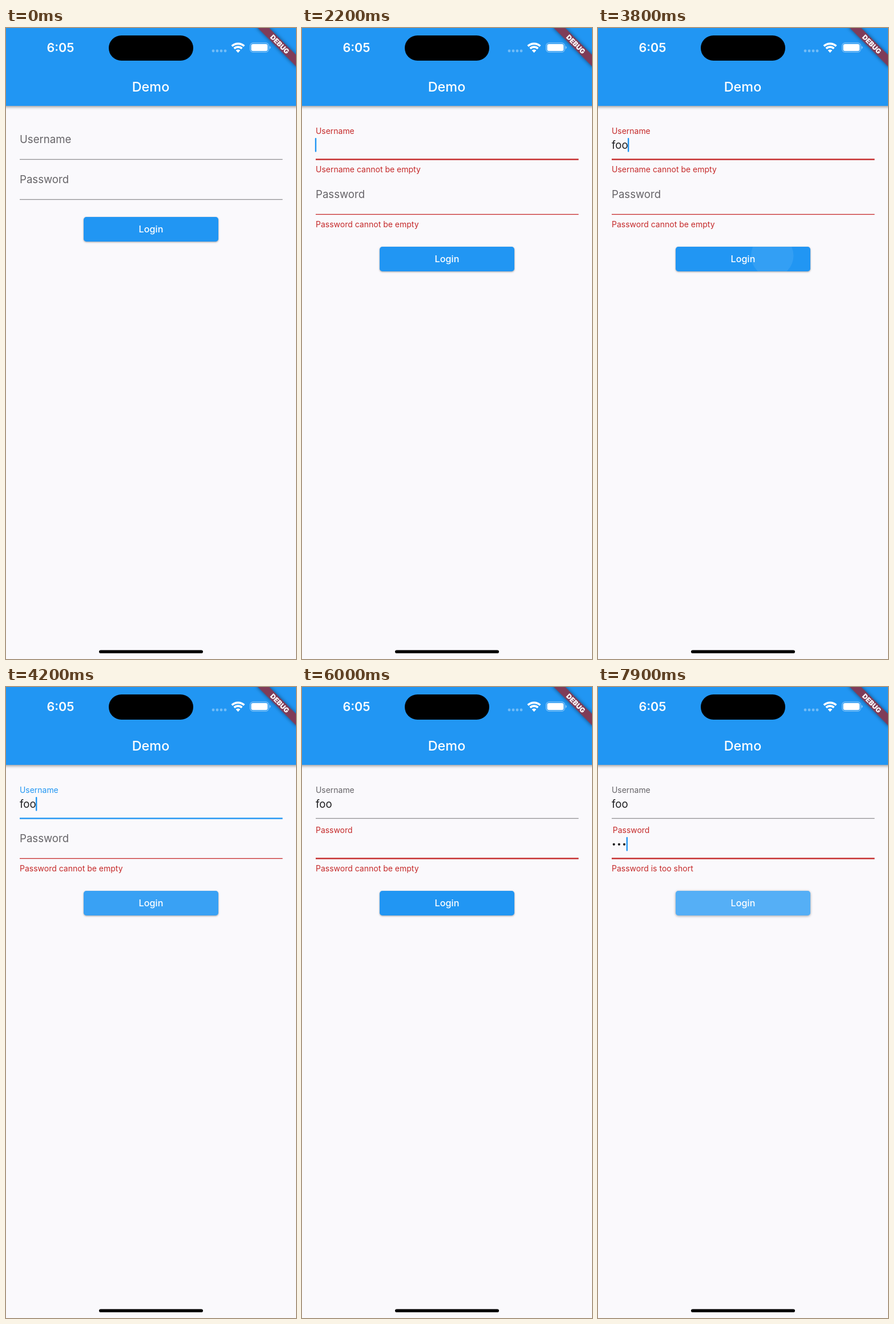
These frames come from a looping animation (508x1102 px, 8 s). An HTML page:

```html
<!DOCTYPE html>
<html lang="en">
<head>
<meta charset="utf-8">
<title>Login form demo</title>
<style>
html, body { margin: 0; width: 100%; height: 100%; overflow: hidden; background: #faf9fc; }
svg { display: block; width: 508px; height: 1102px; font-family: Inter, Roboto, sans-serif; }
text { white-space: pre; }
.mid { text-anchor: middle; fill: #fff; }
.bar { filter: drop-shadow(0 2px 2.5px rgba(0, 0, 0, .38)); }
</style>
</head>
<body>
<svg viewBox="0 0 508 1102">
  <defs>
    <clipPath id="clip"><rect x="-118" y="-21.5" width="236" height="43" rx="4.7"/></clipPath>
  </defs>
  <rect width="508" height="1102" fill="#faf9fc"/>
  <g id="fields"></g>

  <g id="button">
    <rect id="face" x="-118" y="-21.5" width="236" height="43" rx="4.7" fill="#2196f3"/>
    <g clip-path="url(#clip)"><circle id="ripple" fill="#fff"/></g>
    <text class="mid" y="5.5" font-size="16.2" font-weight="500">Login</text>
  </g>

  <rect class="bar" x="-10" y="-10" width="528" height="146" fill="#2196f3"/>
  <text class="mid" x="253.5" y="111" font-size="23.4" font-weight="500">Demo</text>
  <text class="mid" x="95.5" y="42.3" font-size="21.5" font-weight="600">6:05</text>
  <rect x="180" y="13" width="148" height="44" rx="22"/>
  <g id="signal" fill="#fff" opacity=".36"></g>
  <path id="wifi" fill="none" stroke="#fff" stroke-width="3.7"/>
  <path d="M406.5 43.2l-3.9-4.1a5.6 5.6 0 0 1 7.8 0z" fill="#fff"/>
  <rect x="427.6" y="26.1" width="32.6" height="16" rx="5" fill="none" stroke="#fff" stroke-opacity=".45" stroke-width="1.2"/>
  <rect x="429.5" y="28" width="28.8" height="12.2" rx="3.2" fill="#fff"/>
  <path d="M461.7 31.5q2 .7 2 2.6t-2 2.6z" fill="#fff" opacity=".5"/>

  <g transform="translate(508 0) rotate(45)">
    <rect x="-50" y="33.1" width="100" height="14.2" style="filter:drop-shadow(0 0 3.5px rgba(0,0,0,.5))" fill="#7f3c58"/>
    <text class="mid" y="44.5" font-size="11.9" font-weight="900">DEBUG</text>
  </g>
  <rect x="163" y="1086.5" width="182" height="5.6" rx="2.8"/>
</svg>
<script>
const LOOP = 8000, STEP = 167;
const GRAY = [102, 100, 104], LINE = [146, 145, 148], RED = [197, 42, 42], BLUE = [33, 150, 243];
const ERROR_ON = 1034, USER_FOCUS = 1990, USER_VALID = 3905, PASS_FOCUS = 5200, TOO_SHORT = 7750;
const USER_KEYS = [2400, 2560, 2720], PASS_KEYS = [6480, 6580, 6690];
// press time, release time, touch offset from the button's centre
const TAPS = [[980, 1022, 39, 14], [3775, 3894, 52, -6], [7660, 7715, 40, 4]];

const $ = id => document.getElementById(id);
const set = (id, attrs) => { for (const k in attrs) $(id).setAttribute(k, attrs[k]); };
const ramp = (t, start, length = STEP) => Math.min(1, Math.max(0, (t - start) / length));
const mix = (a, b, p) => a + (b - a) * p;
const rgb = c => `rgb(${c.map(Math.round)})`;

function bezier(x1, y1, x2, y2) {
  const at = (a, b, s) => 3 * a * s * (1 - s) ** 2 + 3 * b * s * s * (1 - s) + s ** 3;
  return x => {
    let lo = 0, hi = 1;
    for (let i = 0; i < 20; i++) {
      const s = (lo + hi) / 2;
      if (at(x1, x2, s) < x) lo = s; else hi = s;
    }
    return at(y1, y2, hi);
  };
}
const ease = bezier(.25, .1, .25, 1), fastOutSlowIn = bezier(.4, 0, .2, 1);

// Blends through [start, colour] changes
const colour = (t, first, changes) => rgb(changes.reduce(
  (c, [start, next]) => c.map((v, i) => mix(v, next[i], ramp(t, start))), first));

function shake(t, start) {
  const p = ramp(t, start);
  return 4.72 * (p <= .25 ? -p : p < .75 ? p - .5 : (1 - p) * 4);
}

function blink(ms) {
  const u = ms % 1000;
  return u < 850 ? 1 - ramp(u, 500, 150) : ramp(u, 850, 150);
}

const field = (id, label) => `<g id="${id}">
  <text id="${id}Label" font-size="18.6">${label}</text>
  <g id="${id}Value" fill="#1d1d1f"></g>
  <rect id="${id}Line" x="24" width="460.5"/>
  <rect id="${id}Caret" y="192" width="2.4" height="24.5" rx="1" fill="#2196f3"/>
  <text id="${id}Error" x="24" font-size="14" fill="${rgb(RED)}"></text></g>`;
$('fields').innerHTML = field('user', 'Username') + field('pass', 'Password');
$('userValue').innerHTML = '<text id="typed" x="24" y="210.5" font-size="18.6"></text>';
$('passValue').innerHTML = [0, 1, 2].map(i => `<circle id="dot${i}" cx="${27.8 + 9.1 * i}" cy="204.8" r="2.1"/>`).join('');
$('signal').innerHTML = [0, 1, 2, 3].map(i => `<circle cx="${363 + 7 * i}" cy="40" r="2.4"/>`).join('');
set('wifi', { d: [10, 15.8].map(r => {
  const dx = r * Math.sin(.75), y = 43.2 - r * Math.cos(.75);
  return `M${406.5 - dx} ${y}A${r} ${r} 0 0 1 ${406.5 + dx} ${y}`;
}).join('') });

function drawField(id, t, f) {
  const up = fastOutSlowIn(ramp(t, f.focus));
  const thick = mix(1.3, 2.4, ramp(t, f.focus) - ramp(t, f.blur));
  const count = f.keys.filter(k => t >= k).length;
  const active = t >= f.focus && t < f.blur;
  set(id, { transform: `translate(0 ${f.y})` });
  set(id + 'Label', {
    transform: `translate(${24 + f.shake} ${mix(200.7, 185.2, up)}) scale(${mix(1, .75, up)})`,
    fill: colour(t, GRAY, f.labelColours)
  });
  set(id + 'Line', { y: 229.5 - thick / 2, height: thick, fill: colour(t, LINE, f.lineColours) });
  set(id + 'Caret', {
    x: count ? f.caret(count) : 22.8,
    opacity: active ? blink(t - (count ? f.keys[count - 1] : f.focus)) : 0
  });
  set(id + 'Error', { y: 252 - 4.6 * (1 - f.error), opacity: f.error });
  $(id + 'Error').textContent = f.message;
  return count;
}

function draw(t) {
  const userShift = t >= ERROR_ON && t < USER_VALID + STEP ? 26 : 0;
  const passShift = t >= ERROR_ON ? 26 : 0;

  const letters = drawField('user', t, {
    y: 0, focus: USER_FOCUS, blur: PASS_FOCUS, keys: USER_KEYS,
    shake: shake(t, ERROR_ON), caret: n => 19 + 11 * n,
    labelColours: [[USER_FOCUS, RED], [USER_VALID, BLUE], [PASS_FOCUS, GRAY]],
    lineColours: [[ERROR_ON, RED], [USER_VALID, BLUE], [PASS_FOCUS, LINE]],
    error: ramp(t, ERROR_ON) - ramp(t, USER_VALID), message: 'Username cannot be empty'
  });
  $('typed').textContent = 'foo'.slice(0, letters);

  const dots = drawField('pass', t, {
    y: 70 + userShift, focus: PASS_FOCUS, blur: Infinity, keys: PASS_KEYS,
    shake: shake(t, ERROR_ON) + shake(t, TOO_SHORT), caret: n => 22 + 9.2 * n,
    labelColours: [[PASS_FOCUS, RED]], lineColours: [[ERROR_ON, RED]],
    error: ramp(t, ERROR_ON),
    message: t < TOO_SHORT ? 'Password cannot be empty' : 'Password is too short'
  });
  for (let i = 0; i < 3; i++) set('dot' + i, { opacity: i < dots ? 1 : 0 });

  set('button', { transform: `translate(254 ${351.5 + userShift + passShift})` });
  const [down, up, dx, dy] = TAPS.filter(tap => t >= tap[0]).pop() || TAPS[0];
  const held = Math.max(0, Math.min(t, up) - down) / 1000;
  const p = ease(Math.min(1, held + Math.max(0, t - up) / 225));
  set('ripple', {
    cx: dx * (1 - p), cy: dy * (1 - p), r: mix(36, 126, p),
    opacity: .235 * ramp(t, down, 75) * (1 - ramp(t, up + 225, 150))
  });
  const lift = ramp(t, down, 200) - ramp(t, up + 60, 200);
  $('face').style.filter = `drop-shadow(0 ${1.6 + lift}px ${1.5 + 1.5 * lift}px rgba(0,0,0,.36))`;
}

const begin = performance.now();
function tick() {
  draw((performance.now() - begin) % LOOP);
  requestAnimationFrame(tick);
}
tick();
</script>
</body>
</html>
```
